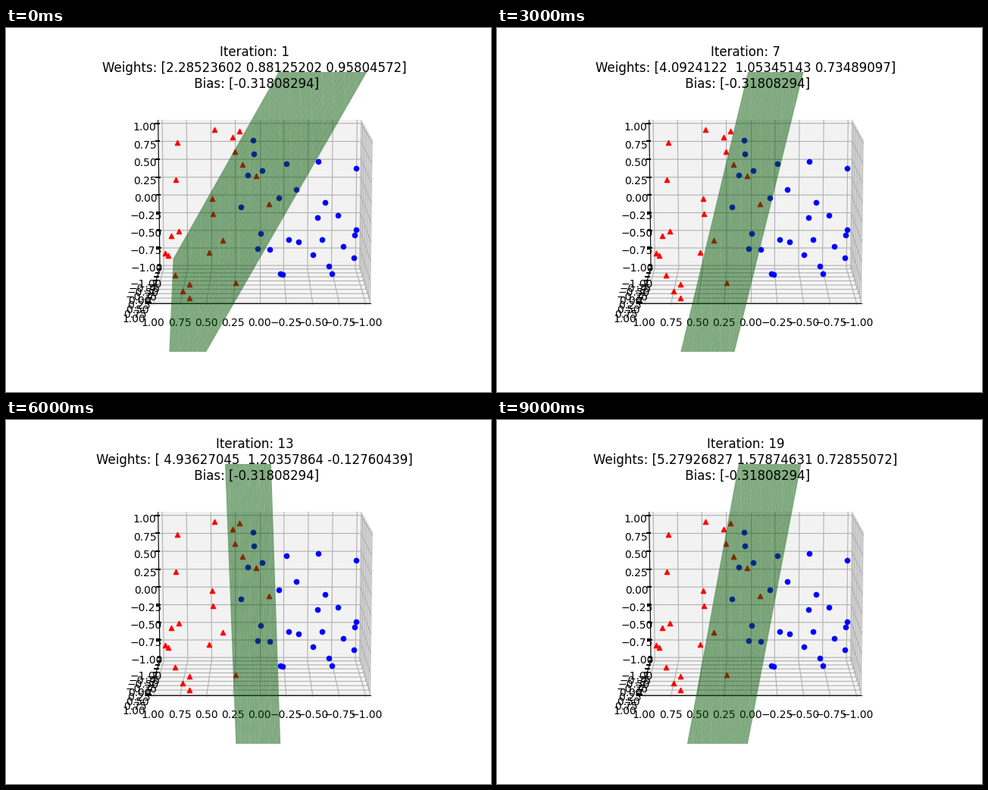
Write a matplotlib script that moves like this. It is 640 px wide and 480 px high and loops after 9.5 s.

```python
import numpy as np
import matplotlib.pyplot as plt
from matplotlib.animation import FuncAnimation
from matplotlib.collections import PolyCollection

W, H, DPI = 640, 480, 100
LEFT, RIGHT, TOP, BOTTOM = 80, 576, 57.6, 427.2

# Perspective camera looking along -y, raised by 10 degrees
DIST = 10
COS, SIN = np.cos(np.radians(10)), np.sin(np.radians(10))
SX, SY = (RIGHT - LEFT) / 0.185, (BOTTOM - TOP) / 0.185
X0, Y0 = LEFT + 0.095 * SX, BOTTOM - 0.095 * SY

EDGE = 1 + 1 / 24          # panes reach a little past the limits
LABEL = EDGE + 0.1476      # tick labels stand further out
TICKS = np.linspace(-1, 1, 9)

BIAS = np.array([-0.31808294])
WEIGHTS = np.array([
    [2.28523602, 0.88125202, 0.95804572],
    [2.74518327, 0.90714436, 0.51726384],
    [3.18156556, 0.91565362, 0.08244697],
    [3.47290843, 0.89367254, 0.61538429],
    [3.76342958, 1.01926437, 0.31450786],
    [3.93485267, 1.08250934, -0.17629483],
    [4.09241220, 1.05345143, 0.73489097],
    [4.24736058, 1.18520397, 0.21846573],
    [4.3782946, 1.21463085, 0.5639278],
    [4.5126083, 1.30657249, 0.3380562],
    [4.62011687, 1.3799018, 0.057254],
    [4.79350264, 1.27480593, -0.21436857],
    [4.93627045, 1.20357864, -0.12760439],
    [5.08199912, 1.14407131, 0.51563047],
    [5.1043827, 1.20946358, 0.29375064],
    [5.17706243, 1.14804811, 0.07100134],
    [5.22439086, 1.31582497, -0.24073856],
    [5.22850739, 1.46230857, 0.27594683],
    [5.27926827, 1.57874631, 0.72855072],
])

RED = [(225, 150), (274, 133), (298, 143), (307, 135), (301, 162), (311, 179),
       (329, 194), (346, 231), (223, 199), (271, 224), (272, 244), (227, 267),
       (217, 273), (285, 279), (267, 295), (209, 296), (213, 299), (222, 325),
       (241, 337), (232, 346), (241, 355), (302, 335)]
BLUE = [(325, 147), (326, 165), (337, 187), (318, 193), (369, 178), (411, 175),
        (461, 184), (382, 212), (359, 223), (309, 235), (420, 229), (410, 249),
        (437, 246), (335, 270), (331, 290), (347, 291), (372, 278), (385, 281),
        (416, 278), (404, 298), (461, 265), (459, 272), (444, 287), (458, 302),
        (425, 313), (429, 323), (361, 323), (364, 324)]


def project(x, y, z):
    """Map data coordinates to stage pixels."""
    p, q = y / 2, z / 2
    depth = DIST - p * COS - q * SIN
    return X0 - SX * x / 2 / depth, Y0 - SY * (q * COS - p * SIN) / depth


def path(points):
    return np.array([project(*p) for p in points])


def point(base, **changes):
    """Copy a corner with some of its coordinates replaced."""
    return [changes.get(k, v) for k, v in zip("xyz", base)]


def line(points, color, width):
    ax.plot(*path(points).T, color=color, lw=width, zorder=1,
            solid_capstyle="butt" if width > 1 else "projecting")


def draw_pane(axis, gray):
    u, v = [k for k in "xyz" if k != axis]
    far = [-EDGE] * 3
    quad = [point(far, **{u: a, v: b})
            for a, b in ((-EDGE, -EDGE), (EDGE, -EDGE), (EDGE, EDGE), (-EDGE, EDGE))]
    color = (gray, gray, gray, 0.5)
    ax.add_patch(plt.Polygon(path(quad), fc=color, ec=color, lw=1, zorder=1))


def draw_axis(axis, edge, tick_dir):
    line([point(edge, **{axis: -EDGE}), point(edge, **{axis: EDGE})], "k", 0.8)
    u, v = [k for k in "xyz" if k != axis]
    far = [-EDGE] * 3
    for t in TICKS:
        base = point(far, **{axis: t})
        line([point(base, **{u: EDGE}), base, point(base, **{v: EDGE})],
             "#b0b0b0", 0.8)
    for t in TICKS:
        base = point(edge, **{axis: t})
        line([point(base, **{tick_dir: EDGE + d}) for d in (-1 / 60, 1 / 30)],
             "k", 1.5)
        spot = point(np.sign(edge) * LABEL, **{axis: t})
        ax.text(*project(*spot), f"{t:.2f}".replace("-", "\u2212"),
                ha="center", va="top", fontsize=10, zorder=1)


def plane_cells(w):
    """Grid cells of the plane w.x + b = 0 as projected quads."""
    x, y = np.meshgrid(*[np.arange(20) / 10 - 1] * 2)
    z = -(w[0] * x + w[1] * y + BIAS[0]) / w[2]
    g = np.stack(project(x, y, z), axis=-1)
    quads = np.stack([g[:-1, :-1], g[:-1, 1:], g[1:, 1:], g[1:, :-1]], axis=2)
    return quads.reshape(-1, 4, 2)


plt.rcParams["font.family"] = "DejaVu Sans"
fig = plt.figure(figsize=(W / DPI, H / DPI), dpi=DPI, facecolor="white")
ax = fig.add_axes([LEFT / W, 1 - BOTTOM / H, (RIGHT - LEFT) / W, (BOTTOM - TOP) / H])
ax.set_axis_off()

for name, gray in zip("xyz", (0.95, 0.9, 0.925)):
    draw_pane(name, gray)
draw_axis("x", [0, EDGE, -EDGE], "y")
draw_axis("y", [EDGE, 0, -EDGE], "x")
draw_axis("z", [EDGE, -EDGE, 0], "x")

for dots, color, marker in ((RED, "red", "^"), (BLUE, "blue", "o")):
    ax.scatter(*(np.array(dots).T + 0.5), s=20, c=color, marker=marker, zorder=2)

plane = PolyCollection([], facecolors=[(0, 0.335, 0, 0.5)], edgecolors="none",
                       linewidths=0, zorder=2.5)
ax.add_collection(plane, autolim=False)
title = ax.set_title("", fontsize=12, y=0.92, pad=6)
ax.set_xlim(LEFT, RIGHT)
ax.set_ylim(BOTTOM, TOP)


def update(i):
    w = WEIGHTS[i]
    plane.set_verts(plane_cells(w))
    title.set_text(f"Iteration: {i + 1}\nWeights: {w}\n Bias: {BIAS}")
    return plane, title


anim = FuncAnimation(fig, update, frames=len(WEIGHTS), interval=500,
                     repeat=True, repeat_delay=0)
plt.show()
```
